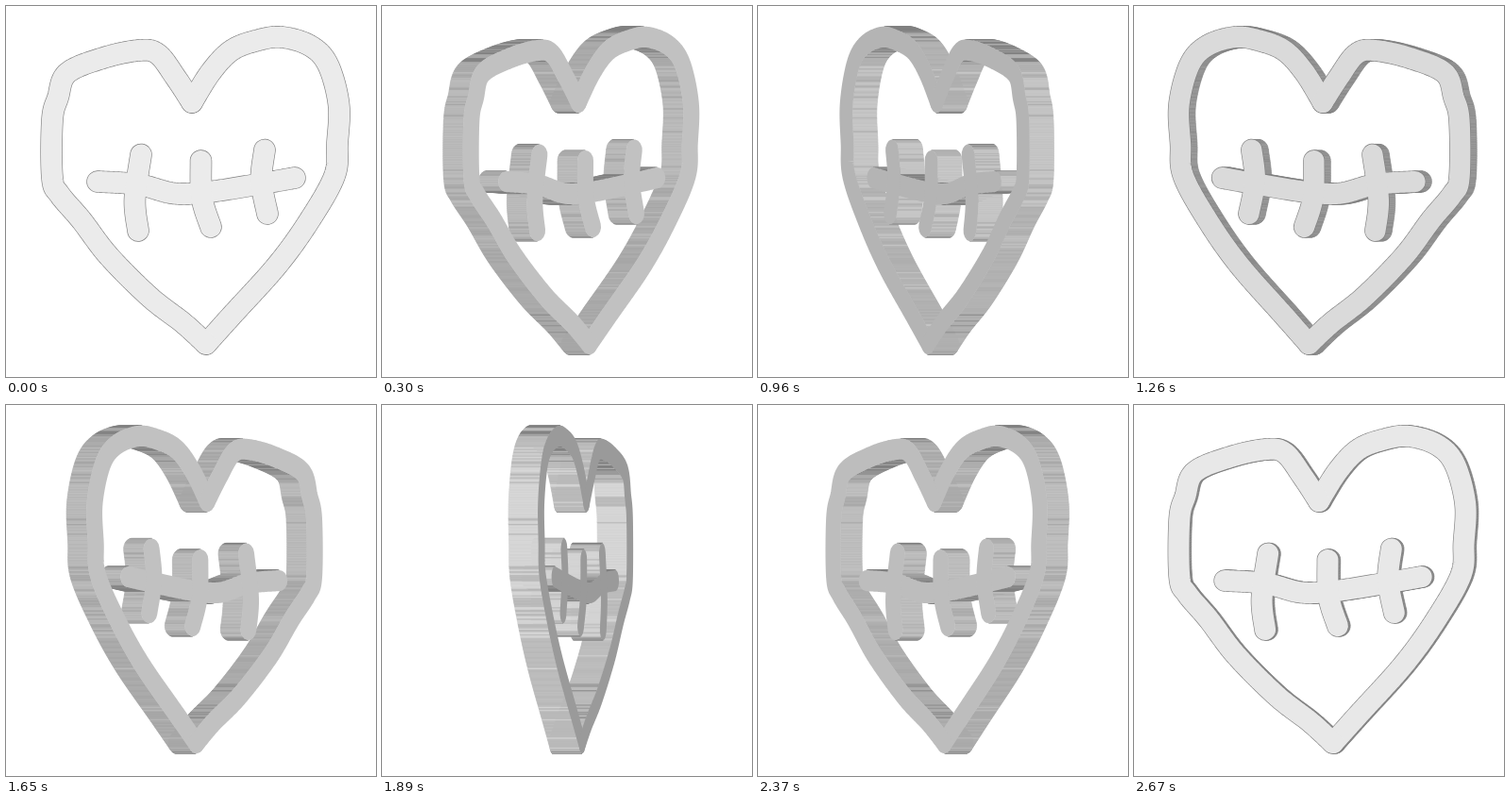
An HTML page with a canvas for the animation above (2700 ms loop, 392 px wide and 393 px high).

```html
<!DOCTYPE html>
<html lang="en">
<head>
<meta charset="utf-8">
<title>Stitched heart</title>
<style>
html, body { margin: 0; width: 100%; height: 100%; overflow: hidden; background: #fff; }
canvas { display: block; width: 392px; height: 393px; }
</style>
</head>
<body>
<canvas id="stage" width="392" height="393"></canvas>
<script>
const ctx = document.getElementById('stage').getContext('2d');
const LOOP = 2700, STEP = 30, AXIS = 200.2, HALF = 16.3, R = 11.1;

// Centre lines of the pen strokes: x, y key points
const STROKES = [
  // right and left half of the heart, from notch to tip
  [197,102, 217,70, 239,47, 266,36.5, 292,33, 322,42, 341,62, 352.5,104,
   351,146, 348,180, 321,228, 287,275, 239,328, 212,358],
  [197,102, 180,76, 161,51, 141,47, 103,55, 65,71, 55,97, 49,121,
   49,182, 57,200, 80,227, 109,265, 152,308, 188,336, 212,358],
  // seam and its three stitches
  [97,186, 140,189, 178,198.5, 214,197, 260,190, 306,182],
  [143,157.5, 136.5,205, 140,238],
  [206.5,164, 207.5,203, 217,234],
  [274,152.5, 270.5,185, 277,220]
].map(curve);

// Catmull-Rom curve through the key points, sampled about every 1.5 px
function curve(flat) {
  const count = flat.length / 2, out = [];
  const at = (i, j) => flat[2 * Math.max(0, Math.min(count - 1, i)) + j];
  for (let i = 0; i < count - 1; i++) {
    const n = Math.ceil(Math.hypot(at(i + 1, 0) - at(i, 0), at(i + 1, 1) - at(i, 1)) / 1.5);
    for (let k = 0; k < n; k++) {
      const t = k / n;
      out.push([0, 1].map(j => {
        const a = at(i - 1, j), b = at(i, j), c = at(i + 1, j), d = at(i + 2, j);
        return b + 0.5 * t * (c - a + t * (2 * a - 5 * b + 4 * c - d + t * (3 * (b - c) + d - a)));
      }));
    }
  }
  out.push([at(count - 1, 0), at(count - 1, 1)]);
  return out;
}

// Clockwise outline of a round-ended stroke
function outline(mid) {
  const last = mid.length - 1, q = Math.PI / 2, out = [];
  const put = (i, turn) => {
    const a = mid[Math.max(0, i - 1)], b = mid[Math.min(last, i + 1)];
    const w = Math.atan2(b[1] - a[1], b[0] - a[0]) + turn;
    out.push([mid[i][0] + R * Math.cos(w), mid[i][1] + R * Math.sin(w)]);
  };
  for (let i = 0; i < last; i++) put(i, -q);
  for (let k = 0; k < 20; k++) put(last, -q + Math.PI * k / 20);
  for (let i = last; i > 0; i--) put(i, q);
  for (let k = 0; k < 20; k++) put(0, q + Math.PI * k / 20);
  return out;
}

let seed = 7;
const random = () => (seed = seed * 16807 % 2147483647) / 2147483647;

// Side walls; their shading normals snap at random to nearby 45° steps, which makes streaks
const walls = STROKES.map(outline).flatMap(loop => loop.map((a, i) => {
  const b = loop[(i + 1) % loop.length];
  const dx = b[0] - a[0], dy = b[1] - a[1], unit = Math.PI / 4;
  const snapped = Math.floor(Math.atan2(-dx, dy) / unit + random()) * unit;
  return { a, b, nx: dy, tone: Math.cos(snapped), x: (a[0] + b[0]) / 2 };
})).sort((p, q) => p.x - q.x);

// Grey by how squarely a surface faces the viewer, with a narrow highlight
function shade(c) {
  const v = Math.round(128 + 85 * c + 22 * c ** 50);
  return `rgb(${v},${v},${v})`;
}

function drawWalls(cos, sin, shift) {
  const px = (p, off) => AXIS + (p[0] - AXIS) * cos + off;
  ctx.lineWidth = 0.6;
  for (const w of sin > 0 ? [...walls].reverse() : walls) {
    if (w.nx * sin >= 0) continue;
    ctx.beginPath();
    ctx.moveTo(px(w.a, shift), w.a[1]);
    ctx.lineTo(px(w.b, shift), w.b[1]);
    ctx.lineTo(px(w.b, -shift), w.b[1]);
    ctx.lineTo(px(w.a, -shift), w.a[1]);
    ctx.closePath();
    ctx.fillStyle = ctx.strokeStyle = shade(Math.max(0, -w.tone * sin));
    ctx.fill();
    ctx.stroke();
  }
}

function drawFace(cos, shift, width, color) {
  ctx.setTransform(cos, 0, 0, 1, AXIS - AXIS * cos + shift, 0);
  ctx.lineWidth = width;
  ctx.strokeStyle = color;
  for (const mid of STROKES) {
    ctx.beginPath();
    mid.forEach(p => ctx.lineTo(p[0], p[1]));
    ctx.stroke();
  }
  ctx.resetTransform();
}

function draw(angle) {
  const cos = Math.cos(angle), sin = Math.sin(angle), face = Math.abs(cos);
  const shift = HALF * sin * Math.sign(cos);
  ctx.fillStyle = '#fff';
  ctx.fillRect(0, 0, 392, 393);
  ctx.lineJoin = ctx.lineCap = 'round';
  drawWalls(cos, sin, shift);
  // thin dark edge when the face is nearly square-on
  if (face > 0.97) drawFace(cos, shift, 2 * R + 1.3, shade(0));
  drawFace(cos, shift, 2 * R, shade(face));
}

function tick() {
  const step = Math.floor((performance.now() % LOOP) / STEP);
  draw(step * STEP / LOOP * 2 * Math.PI);
  requestAnimationFrame(tick);
}
tick();
</script>
</body>
</html>
```
